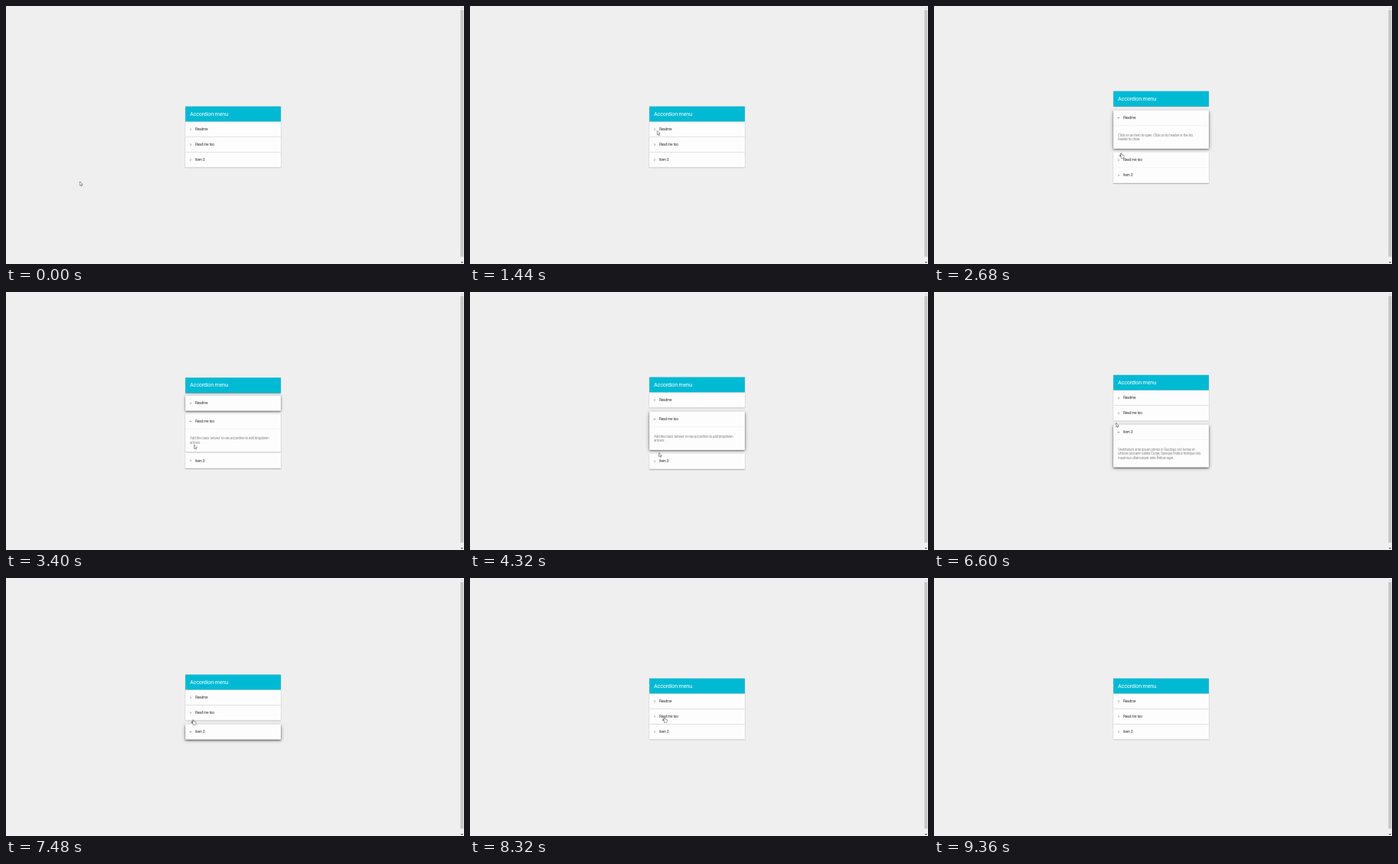
An HTML page that plays this animation: 600x338 px, repeating every 9800 ms.

```html
<!DOCTYPE html>
<html lang="en">
<head>
<meta charset="utf-8">
<title>Accordion menu</title>
<style>
  html, body { margin: 0; width: 100%; height: 100%; overflow: hidden; background: #f0eff0; }
  #page {
    position: absolute; left: 0; top: 0; width: 1920px; height: 1081.6px; overflow: hidden;
    transform: scale(.3125); transform-origin: 0 0;
    background: #f0eff0; font-family: Roboto, sans-serif; letter-spacing: -.03em;
  }
  .box { position: absolute; left: 751.5px; width: 400px; background: #fdfdfe; }
  .title {
    height: 64px; padding-left: 20px; box-sizing: border-box;
    background: #00bad4; color: #fff; font-size: 22.8px; line-height: 64px; z-index: 1;
  }
  .head {
    position: relative; height: 64px; box-sizing: border-box; padding-left: 42px;
    border-bottom: 1px solid #dedee0; color: #333; font-size: 15.1px; line-height: 64px;
  }
  .head svg { position: absolute; left: 14px; top: 22px; width: 20px; height: 20px; }
  .head path { fill: none; stroke: #555; stroke-width: 2; }
  .body { overflow: hidden; position: relative; }
  .text {
    position: absolute; left: 20px; white-space: nowrap;
    color: #858585; font-size: 14.3px; line-height: 18px;
  }
  #over { position: absolute; left: 0; top: 0; z-index: 9; }
</style>
</head>
<body>
<div id="page">
  <div class="box title">Accordion menu</div>
  <svg id="over" width="1920" height="1082">
    <rect x="1903" width="17" height="1082" fill="#f1f1f1"/>
    <rect x="1905" y="17" width="13" height="1034" fill="#c6c6c6"/>
    <path d="M1907.500 10l4-4 4 4z" fill="#a3a3a3"/>
    <path d="M1906.500 1072h10l-5 6z" fill="#505050"/>
    <g id="cursor" stroke="#111" stroke-width="1.300" fill="#fff">
      <path id="arrow" d="M0 0V17L4 13.500 6.500 19.500 9.500 18.200 7 12.500H12Z"/>
      <path id="hand" d="M-2 1.500Q0-1.500 2 1.500V8Q4 6 6 8.500 8 7 9.500 9.500 12 8.500 12.500 11V16Q12 19 10 22H0Q-3-.5-7 13.500-7 10.500-5 11L-2 14Z"/>
    </g>
  </svg>
</div>
<script>
const LOOP = 9800, SLIDE = 400, FADE = 300;
const CENTER = 549, ROW = 64, GAP = 16, SCALE = .3125;

// label, body lines, open time, close time
const ITEMS = [
  ['Readme', ['Click on an item to open. Click on its header or the list', 'header to close.'], 1600, 2945],
  ['Read me too', ["Add the class 'arrows' to nav.accordion to add dropdown", 'arrows.'], 2945, 5145],
  ['Item 3', ['Vestibulum ante ipsum primis in faucibus orci luctus et',
    'ultrices posuere cubilia Curae; Quisque finibus tristique nisi,',
    'maximus ullamcorper ante finibus eget.'], 5145, 7090]
];

// time, x, y of the pointer tip on the stage
const TRAIL = [
  [0, 96.8, 230], [40, 96.8, 230], [400, 188, 166], [660, 242, 141], [960, 245.3, 163.5],
  [1440, 245.3, 163.5], [1600, 245, 165], [2300, 245, 165], [2680, 245.2, 192.5],
  [2900, 246.5, 200], [3800, 246.5, 200], [4060, 263, 119], [4320, 247.5, 210.5],
  [4680, 250.8, 223.5], [5880, 250.8, 223.5], [6180, 284, 118], [6500, 240, 160],
  [6800, 245, 185.5], [8040, 245, 185.5], [8220, 238, 188], [8600, 320, 160],
  [9000, 433, 121], [9320, 573, 71], [LOOP, 573, 71]
];

const $ = id => document.getElementById(id);
const page = $('page'), title = page.querySelector('.title');
const clamp = v => Math.min(1, Math.max(0, v));
const swing = v => .5 - Math.cos(clamp(v) * Math.PI) / 2;

// cubic-bezier(.25, .1, .25, 1)
function ease(x) {
  x = clamp(x);
  let lo = 0, hi = 1, u = .5;
  for (let i = 0; i < 20; i++) {
    u = (lo + hi) / 2;
    if (.75 * u * (1 - u) + u ** 3 < x) lo = u; else hi = u;
  }
  return .3 * u * (1 - u) ** 2 + 3 * u * u * (1 - u) + u ** 3;
}

const items = ITEMS.map(([label, lines, open, close]) => {
  const box = document.createElement('div');
  box.className = 'box';
  box.innerHTML = `<div class="head"><svg><path/></svg>${label}</div>
    <div class="body"><div class="text">${lines.join('<br>')}</div></div>`;
  page.append(box);
  const find = s => box.querySelector(s);
  return { box, open, close, full: lines.length * 18 + 61,
    icon: find('path'), body: find('.body'), text: find('.text') };
});

function shadow(el, k) {
  const mix = (a, b) => a + (b - a) * k;
  el.style.boxShadow =
    `0 ${mix(2, 4)}px ${mix(4, 6)}px rgba(0,0,0,${mix(.28, .42)}),` +
    `0 ${mix(1, 3)}px ${mix(3, 16)}px rgba(0,0,0,${mix(.14, .4)})`;
}

function pointer(t) {
  const i = Math.max(1, TRAIL.findIndex(p => p[0] > t));
  const a = TRAIL[i - 1], b = TRAIL[i], d = b[0] - a[0], u = (t - a[0]) / d;
  const still = (p, q) => !p || !q || (p[1] === q[1] && p[2] === q[2]);
  const slope = (j, c) => {
    const p = TRAIL[j - 1], m = TRAIL[j], q = TRAIL[j + 1];
    return still(p, m) || still(m, q) ? 0 : (q[c] - p[c]) / (q[0] - p[0]);
  };
  return [1, 2].map(c => {
    const s = u * u * (3 - 2 * u);
    return a[c] + (b[c] - a[c]) * s
      + d * (slope(i - 1, c) * u * (1 - u) ** 2 - slope(i, c) * u * u * (1 - u));
  });
}

function render(t) {
  for (const it of items) {
    const since = t - it.open, past = t - it.close;
    it.slide = swing(since / SLIDE) - swing(past / SLIDE);
    it.lift = ease((since - SLIDE) / FADE) - ease((past - SLIDE) / FADE);
    it.active = since >= SLIDE && past < SLIDE;
    it.height = it.full * it.slide;
  }
  const gaps = [0, 1, 2, 3].map(i =>
    GAP * Math.max(items[i - 1]?.lift || 0, items[i]?.lift || 0));
  const total = 4 * ROW + items.reduce((s, it) => s + it.height, 0) + gaps.reduce((a, b) => a + b);
  let y = CENTER - total / 2;
  const heads = [y];
  title.style.top = y + 'px';
  shadow(title, 0);
  y += ROW;

  items.forEach((it, i) => {
    y += gaps[i];
    heads.push(y);
    it.box.style.top = y + 'px';
    it.box.style.zIndex = it.active ? 3 : 2;
    it.body.style.height = it.height + 'px';
    it.text.style.top = 31 * it.slide + 'px';
    it.icon.setAttribute('d', it.active ? 'M3 10H12' : 'M6 6L10 10 6 14');
    shadow(it.box, it.active ? it.lift ** 2 : it.lift);
    y += ROW + it.height;
  });

  const [px, py] = pointer(t).map(v => v / SCALE);
  const hand = t > 1440 && px > 751.5 && px < 1151.5 && heads.some(h => py >= h && py < h + ROW);
  $('cursor').setAttribute('transform', `translate(${px} ${py})`);
  $('cursor').style.display = t < 9360 ? '' : 'none';
  $('hand').style.display = hand ? '' : 'none';
  $('arrow').style.display = hand ? 'none' : '';
}

const start = performance.now();
function tick() {
  const t = (performance.now() - start) % LOOP;
  render(Math.floor(t / 40) * 40);
  requestAnimationFrame(tick);
}
tick();
</script>
</body>
</html>
```
